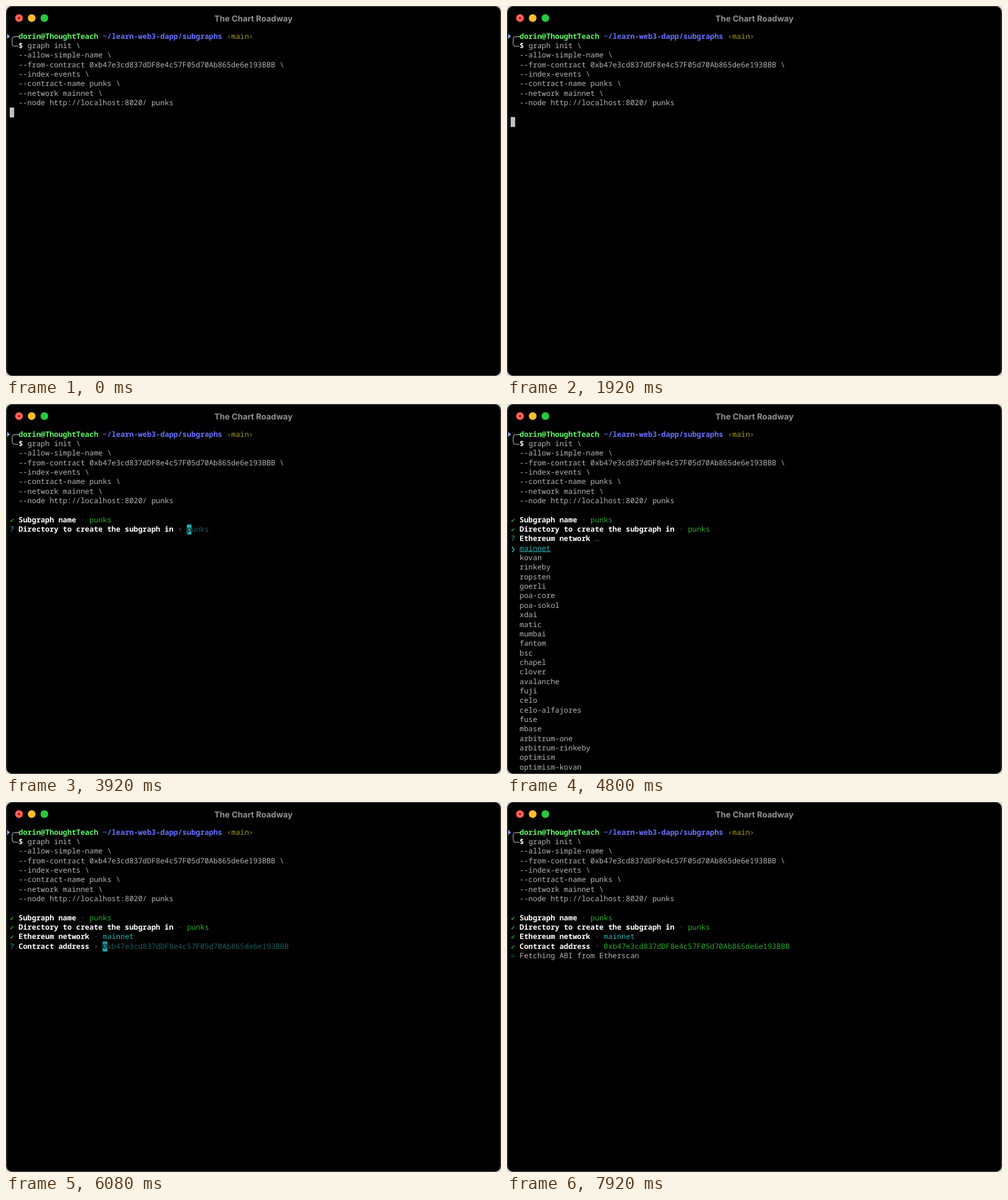
Write an HTML page that moves like this. It is 800 px wide and 597 px high and loops after 8000 ms.

```html
<!DOCTYPE html>
<html lang="en">
<head>
<meta charset="utf-8">
<title>Terminal session</title>
<style>
  html, body { margin: 0; width: 100%; height: 100%; overflow: hidden; background: #dcdcdc; }
  svg { display: block; width: 100%; height: 100%; }
  text {
    font: 400 11.93px "Noto Sans Mono", "DejaVu Sans Mono", monospace;
    text-rendering: geometricPrecision;
    fill: #b4b4b4;
  }
  .title { font: 700 13.2px Inter, "Open Sans", sans-serif; fill: #929292; text-anchor: middle; }
  .bold { font-weight: 700; fill: #fff; }
  .user { font-weight: 700; fill: #5ff967; }
  .path { font-weight: 700; fill: #6871ff; }
  .branch { fill: #a39d1c; }
  .mark { font-family: "DejaVu Sans", sans-serif; font-size: 9px; }
  .green { fill: #2aa92d; }
  .cyan { fill: #2bb0b3; }
  .link { text-decoration: underline; }
  .dim { fill: #666; }
  .hint { fill: #1d5c5e; }
  .black { fill: #000; }
</style>
</head>
<body>
<svg id="stage" viewBox="0 0 800 597">
  <rect width="800" height="597" rx="10"/>
  <rect x="1" y="0.5" width="798" height="596" rx="9.5" fill="none" stroke="#555"/>
  <circle cx="21" cy="19.5" r="6.2" fill="#ff5f57"/>
  <circle cx="21" cy="19.5" r="1.8" fill="#8c1a10"/>
  <circle cx="41.5" cy="19.5" r="6.2" fill="#febc2e"/>
  <circle cx="62" cy="19.5" r="6.2" fill="#28c840"/>
  <text class="title" x="400" y="24.5">The Chart Roadway</text>
  <path d="M2 45L6.3 49L2 53Z" fill="#8fa8ff"/>
  <path d="M21 49.5H13.5Q10 49.5 10 53V61.5Q10 65 13.5 65H20" fill="none" stroke="#c4c4c4"/>
</svg>
<script>
const LOOP = 8000, LEFT = 6, TOP = 41, CELL = 7.16, LINE = 15.35, BASELINE = 11.5;
const T = { newline: 80, name: 2000, directory: 3440, network: 4800, address: 5760, fetch: 7440 };
const stage = document.getElementById('stage');
const scenes = [];

function add(parent, tag, attrs, text = '') {
  const node = document.createElementNS('http://www.w3.org/2000/svg', tag);
  for (const key in attrs) node.setAttribute(key, attrs[key]);
  node.textContent = text;
  return parent.appendChild(node);
}

const colX = col => LEFT + col * CELL;
const rowY = row => TOP + row * LINE;

function write(parent, row, col, text, cls = '') {
  add(parent, 'text', { x: colX(col), y: rowY(row) + BASELINE, class: cls }, text);
}

function block(parent, row, col, fill) {
  add(parent, 'rect', { x: colX(col), y: rowY(row), width: CELL, height: 16, fill });
}

function scene(from, to = LOOP) {
  const node = add(stage, 'g', {});
  scenes.push({ node, from, to });
  return node;
}

function ask(from, to, row, label, value) {
  const g = scene(from, to), end = label.length + 3;
  write(g, row, 0, '?', 'cyan');
  write(g, row, 2, label, 'bold');
  write(g, row, end, '›', 'dim');
  block(g, row, end + 2, '#20b4b7');
  write(g, row, end + 2, value[0], 'black');
  write(g, row, end + 3, value.slice(1), 'hint');
}

function answer(from, row, label, value, cls = 'green') {
  const g = scene(from), end = label.length + 3;
  write(g, row, 0, '✔', 'mark green');
  write(g, row, 2, label, 'bold');
  write(g, row, end, '·', 'dim');
  write(g, row, end + 2, value, cls);
}

const contract = '0xb47e3cd837dDF8e4c57F05d70Ab865de6e193BBB';
const command = [
  '--allow-simple-name \\', `--from-contract ${contract} \\`, '--index-events \\',
  '--contract-name punks \\', '--network mainnet \\', '--node http://localhost:8020/ punks'
];
const networks = ('kovan rinkeby ropsten goerli poa-core poa-sokol xdai matic mumbai fantom bsc chapel ' +
  'clover avalanche fuji celo celo-alfajores fuse mbase arbitrum-one arbitrum-rinkeby ' +
  'optimism optimism-kovan').split(' ');

// Shell prompt and command
write(stage, 0, 2, 'dorin@ThoughtTeach', 'user');
write(stage, 0, 21, '~/learn-web3-dapp/subgraphs', 'path');
write(stage, 0, 49, '‹main›', 'branch');
write(stage, 1, 2, '$', 'bold');
write(stage, 1, 4, 'graph init \\');
command.forEach((line, i) => write(stage, i + 2, 2, line));

block(scene(0, T.newline), 8, 0, '#c0c0c0');
block(scene(T.newline, T.name), 9, 0, '#c0c0c0');

// Questions
ask(T.name, T.directory, 9, 'Subgraph name', 'punks');
answer(T.directory, 9, 'Subgraph name', 'punks');
ask(T.directory, T.network, 10, 'Directory to create the subgraph in', 'punks');
answer(T.network, 10, 'Directory to create the subgraph in', 'punks');

const menu = scene(T.network, T.address);
write(menu, 11, 0, '?', 'cyan');
write(menu, 11, 2, 'Ethereum network', 'bold');
write(menu, 11, 19, '…', 'dim');
write(menu, 12, 0, '❯', 'mark cyan');
write(menu, 12, 2, 'mainnet', 'cyan link');
networks.forEach((name, i) => write(menu, 13 + i, 2, name));

answer(T.address, 11, 'Ethereum network', 'mainnet', 'cyan');
ask(T.address, T.fetch, 12, 'Contract address', contract);
answer(T.fetch, 12, 'Contract address', contract);

// Braille spinner: the low six bits of each character are its dots
const fetching = scene(T.fetch);
write(fetching, 13, 2, 'Fetching ABI from Etherscan');
const spinner = '⠋⠙⠹⠸⠼⠴⠦⠧⠇⠏';
const dots = Array.from({ length: 6 }, (_, i) => add(fetching, 'circle', {
  cx: i < 3 ? 8.3 : 11.4, cy: rowY(13) + 2.9 + (i % 3) * 3.2, r: 0.75, class: 'cyan'
}));

function render(t) {
  for (const { node, from, to } of scenes) {
    node.style.display = t >= from && t < to ? '' : 'none';
  }
  const step = Math.max(0, Math.floor((t - T.fetch) / 80)) % spinner.length;
  const bits = spinner.charCodeAt(step);
  dots.forEach((dot, i) => { dot.style.display = bits >> i & 1 ? '' : 'none'; });
}

const start = performance.now();
function tick() {
  render((performance.now() - start) % LOOP);
  requestAnimationFrame(tick);
}
tick();
</script>
</body>
</html>
```
